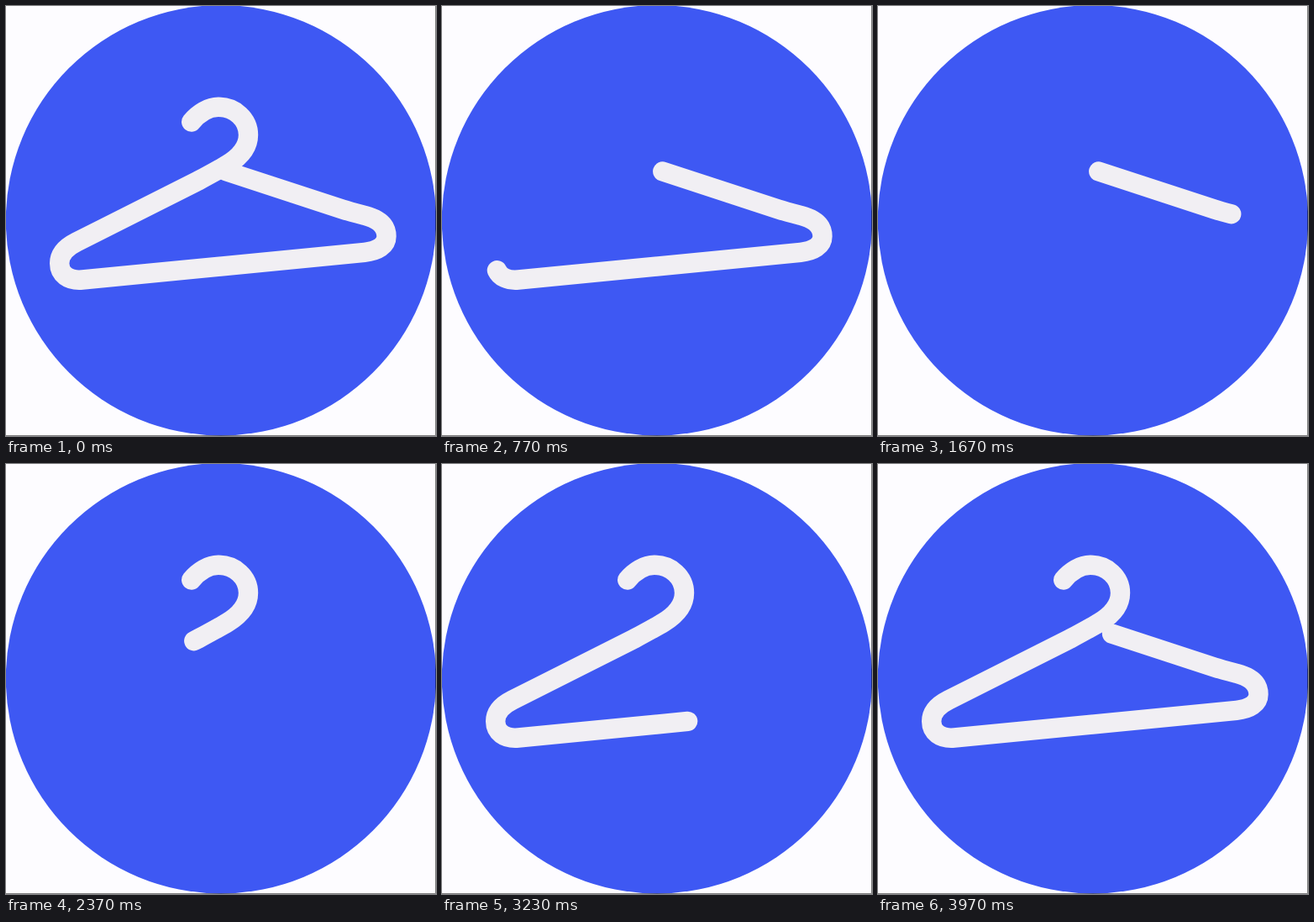
Write an HTML page that moves like this. It is 512 px wide and 512 px high and loops after 4010 ms.

```html
<!DOCTYPE html>
<html lang="en">
<head>
<meta charset="utf-8">
<title>Hanger</title>
<style>
  html, body { margin: 0; width: 100%; height: 100%; overflow: hidden; background: #fdfcff; }
  svg { display: block; width: 100vw; height: 100vh; }
  .disc { fill: #3e58f3; }
  .edge { fill: none; stroke: #000; stroke-opacity: .5; }
  .wire {
    fill: none;
    stroke: #f1eff3;
    stroke-width: 23.4;
    stroke-linecap: round;
    stroke-linejoin: round;
    stroke-dasharray: 1000 2000;
    animation: trace 4010ms -4ms infinite;
  }
  /* Unwinds from the hook, then is drawn again, at 30 steps a second. */
  @keyframes trace {
    0% { stroke-dashoffset: 0; animation-timing-function: steps(60, end); }
    49.875% { stroke-dashoffset: -1000; animation-timing-function: step-start; }
    49.876% { stroke-dashoffset: 1000.1; animation-timing-function: steps(60, end); }
    99.75%, 100% { stroke-dashoffset: 0; }
  }
</style>
</head>
<body>
<svg viewBox="0 0 512 512">
  <circle class="disc" cx="256" cy="255.2" r="256.2"/>
  <path class="wire" pathLength="1000" d="
    M220.7 138
    C229 128 241 120.3 253 120.3
    C272.5 120.3 288.5 135 288.5 153.5
    C288.5 170 277 180.5 264 188.5
    C256 193.4 240 202 226.5 209.3
    L84 281
    C71 287.5 63.7 296 63.7 306.5
    C63.7 319 74 327.5 91 326
    L427 293.3
    C442 291.9 453 285.5 453 274.3
    C453 261 443 253.6 427.5 249.5
    C418 247 409 244.7 400 241.8
    L262.8 197"/>
  <path class="edge" d="M511.5 0V511.5H0"/>
</svg>
</body>
</html>
```
